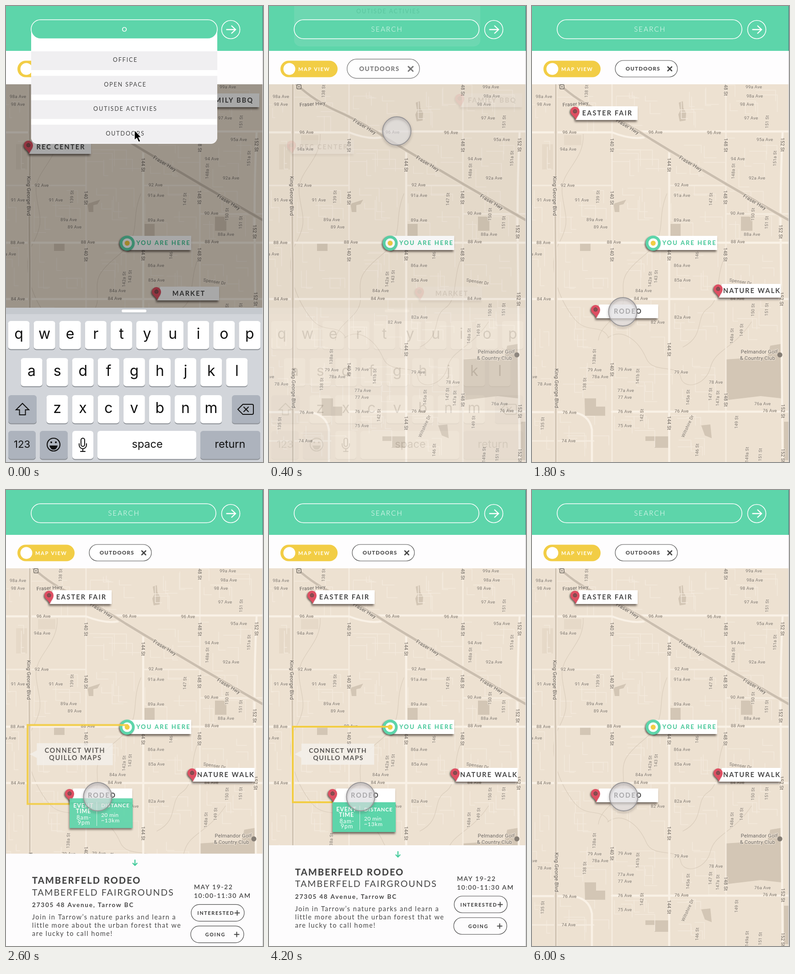
Recreate the animation shown at these times as an HTML page with a canvas. Size 562 by 996 pixels, loop 6100 ms.

```html
<!DOCTYPE html>
<html lang="en">
<head>
<meta charset="utf-8">
<title>Event map search</title>
<style>
  html, body { margin: 0; width: 100%; height: 100%; overflow: hidden; background: #ede1d1; }
  canvas { display: block; }
</style>
</head>
<body>
<canvas id="stage" width="562" height="996"></canvas>
<script>
const W = 562, H = 996, LOOP = 6100;
const TEAL = '#5dd5aa', YELLOW = '#f2cd45', INK = '#454545';

function surface(canvas) {
  canvas.width = W;
  canvas.height = H;
  const context = canvas.getContext('2d');
  context.lineCap = 'round';
  return context;
}
const stage = surface(document.getElementById('stage'));
const map = surface(document.createElement('canvas'));
const layer = surface(document.createElement('canvas'));
let g = map;

function text(str, x, y, size, { weight = 400, gap = 0, color = INK, align = 'center', font = 'Lato' } = {}) {
  g.font = `${weight} ${size}px ${font}, sans-serif`;
  g.letterSpacing = gap + 'px';
  g.textAlign = align;
  g.textBaseline = 'middle';
  g.fillStyle = color;
  g.fillText(str, x + (align === 'center' ? gap / 2 : 0), y + 0.5);
}
function rect(x, y, w, h, fill) {
  g.fillStyle = fill;
  g.fillRect(x, y, w, h);
}
function round(x, y, w, h, r, fill, stroke, width = 1.5) {
  g.beginPath();
  g.roundRect(x, y, w, h, r);
  if (fill) { g.fillStyle = fill; g.fill(); }
  if (stroke) { g.strokeStyle = stroke; g.lineWidth = width; g.stroke(); }
}
function disc(x, y, r, fill, stroke, width) {
  round(x - r, y - r, 2 * r, 2 * r, r, fill, stroke, width);
}
function line(d, color, width) {
  g.strokeStyle = color;
  g.lineWidth = width;
  g.stroke(new Path2D(d));
}
function shape(d, fill) {
  g.fillStyle = fill;
  g.fill(new Path2D(d));
}
function shadow(x, y, blur, color = 'rgba(40,30,25,.6)') {
  g.shadowOffsetX = x;
  g.shadowOffsetY = y;
  g.shadowBlur = blur;
  g.shadowColor = color;
}
// Draws on a separate layer, so that overlapping parts fade as one.
function group(alpha, draw) {
  if (alpha <= 0) return;
  const below = g;
  g = layer;
  g.clearRect(0, 0, W, H);
  g.save();
  draw();
  g.restore();
  g = below;
  g.globalAlpha = alpha;
  g.drawImage(layer.canvas, 0, 0);
  g.globalAlpha = 1;
}
function zoom(cx, cy, scale) {
  g.translate(cx, cy);
  g.scale(scale, scale);
  g.translate(-cx, -cy);
}

// ---- Map ----
const AVENUES = {
  '99a': [485, 177], '98a': [26, 198, 487, 197], '98': [26, 215, 470, 215], '97': [479, 245],
  '96': [82, 276, 270, 276, 398, 277], '95a': [509, 292], '94a': [79, 313], '94': [450, 334],
  '92a': [492, 376], '92': [78, 392, 327, 391], '91a': [328, 414], '91': [26, 424, 109, 424],
  '90': [449, 453], '89a': [137, 467, 328, 468], '89': [150, 483], '88a': [481, 499],
  '88': [25, 517, 179, 516, 450, 515], '87a': [4, 542], '86a': [328, 567], '85a': [329, 599],
  '84a': [244, 622], '84': [26, 640, 238, 639, 449, 639], '82a': [329, 680], '82': [275, 691],
  '79': [137, 795, 203, 794, 326, 800, -4, 810], '78a': [149, 810], '78': [27, 826, 402, 822],
  '77a': [205, 840], '77': [203, 855], '76a': [504, 869],
  '76': [82, 888, 203, 886, 327, 885, 520, 884], '75': [203, 917], '74': [80, 950]
};
const MAIN_STREETS = {
  140: [175, 304, 175, 419, 175, 543, 175, 794], 144: [300, 347, 300, 541, 300, 750, 300, 911],
  148: [424, 181, 424, 304, 423, 418, 423, 543, 424, 860],
  152: [548, 303, 544, 493, 546, 640, 549, 885, 549, 982]
};
const SIDE_STREETS = {
  '135': [23, 912], '138': [119, 186, 115, 826], '138a': [136, 766], '139': [144, 417],
  '141b': [231, 809], '142': [240, 894], '142a': [258, 597], '143': [271, 591],
  '145a': [341, 855], '146': [361, 539, 361, 970], '147': [391, 422, 390, 848], '147a': [406, 857],
  '148a': [440, 361, 437, 721], '149': [458, 708, 447, 909], '149a': [470, 980],
  '150': [483, 455, 483, 664], '151': [514, 253, 513, 473, 513, 663, 499, 980], '151a': [531, 333]
};

function mapText(str, x, y, degrees = 0, size = 9.8, color = '#7f776d') {
  g.save();
  g.translate(x, y);
  g.rotate(degrees * Math.PI / 180);
  g.font = `${size}px Roboto, sans-serif`;
  g.textAlign = 'center';
  g.textBaseline = 'middle';
  g.letterSpacing = '0.2px';
  g.strokeStyle = '#efe4d6';
  g.lineWidth = 2.5;
  g.strokeText(str, 0.1, 0.5);
  text(str, 0, 0, size, { font: 'Roboto', color, gap: 0.2 });
  g.restore();
}
function labels(table, suffix, degrees, size, color) {
  for (const [name, at] of Object.entries(table))
    for (let i = 0; i < at.length; i += 2) mapText(name + suffix, at[i], at[i + 1], degrees, size, color);
}
function drawMap() {
  let seed = 11;
  const random = () => (seed = seed * 16807 % 2147483647) / 2147483647;
  const columns = [0, 52, 175, 300, 424, 548], rows = [171, 276, 392, 517, 640, 764, 887, 996];
  rect(0, 0, W, H, '#ede1d1');
  g.lineJoin = 'round';

  shape('M424 772L515 766 521 742 545 738V857L500 852 424 861Z M115 857h25v18h20v20h-44z M248 940h50v25h-30v-15h-20z'
    + 'M457 460h25v31h-25z M303 476h22v26h-22z M105 518h23v17h-23z M178 432l28-9-6 10-9 2v15h-10z'
    + 'M370 916l20-2 3 30-15-6z M551 908h11v84h-11z M321 211l9-3 1 15 6 10-1 17-13 2-3-15 4-8z', '#d3c6b5');
  shape('M22 302h24v55h-24z M70 282h38v22h-38z', '#e6d9c8');

  for (let r = 0; r < 7; r++) for (let c = 0; c < 5; c++) {
    if (r > 4 && c === 4 || c === 1 && r === 1) continue;
    const x = columns[c], y = rows[r], w = columns[c + 1] - x, h = rows[r + 1] - y;
    for (let n = 0; n < (c ? 7 : 3); n++) {
      const px = x + random() * w * 0.7, py = y + random() * h * 0.7;
      const dx = w * (0.15 + random() * 0.3), dy = h * (0.1 + random() * 0.25);
      line(random() < 0.5 ? `M${px} ${py}h${dx}v${dy}` : `M${px} ${py}v${dy}h${dx * 0.5}`, '#f3e9dc', 1.5);
    }
  }
  line('M112 280C115 340 60 360 66 410S85 470 58 520 60 640 90 680 150 690 168 725'
    + 'M295 410C270 470 300 500 245 545S200 600 200 640 150 690 145 730M165 725C200 700 235 735 250 770S320 780 325 810 380 830 390 790 440 750 480 690'
    + 'M423 545C400 590 415 640 385 660S380 720 330 745', '#dacdbc', 1.2);
  line('M0 392H175M300 392H424M424 454H562M175 171V996M424 171V996M0 950H135M175 764V996', '#f5ecdf', 3);
  line('M0 276H175Q215 292 245 287M225 274H562M0 517H562M0 640H562M300 315V996M548 276Q542 400 544 520T548 996'
    + 'M0 887H85Q125 890 131 925V996M175 886H562', '#f9f1e6', 4.5);
  line('M52 171V360Q50 460 52 560V996', '#f2e7d9', 8);
  line('M52 171V360Q50 460 52 560V996', '#d2c5b4', 3.5);
  const highway = 'M60 171Q100 208 150 230T262 292L300 315 425 389 562 468';
  line(highway, '#eee2d3', 9);
  line(highway, '#cabeaf', 5);

  labels(AVENUES, ' Ave', 0);
  labels(MAIN_STREETS, ' St', 90, 10.3, '#6e675f');
  labels(SIDE_STREETS, ' St', -88, 9.6);
  const road = '#5f5952';
  mapText('Fraser Hwy', 95, 214, -4, 11, road);
  mapText('Fraser Hwy', 209, 263, 31, 11, road);
  mapText('Fraser Hwy', 347, 344, 31, 11, road);
  mapText('Fraser Hwy', 487, 428, 31, 11, road);
  mapText('King George Blvd', 50, 415, 90, 11, road);
  mapText('King George Blvd', 54, 835, 90, 11, road);
  mapText('Spenser Dr', 456, 602, 9);
  mapText('Wiltshire Dr', 340, 918, -66);
  mapText('Pelmandor Golf', 497, 755, 0, 11.3, '#6b655e');
  mapText('& Country Club', 493, 769, 0, 11.3, '#6b655e');
  disc(542, 762, 5.5, '#857d74');
  round(61, 172, 9, 9, 1, '#efe4d6', '#6b655e', 1.5);
  disc(65.5, 176.5, 1.5, '#6b655e');
}

// ---- Markers and event details ----
function tag(name, x, y, textX = x + 70) {
  g.save();
  shadow(-2, 4, 4);
  shape(`M${x + 8} ${y}H${x + 137}V${y + 30}H${x + 1}Z`, '#fff');
  shadow(-2, 2, 3);
  shape(`M${x + 2} ${y + 30}C${x} ${y + 22} ${x - 10} ${y + 19} ${x - 10} ${y + 11}a10 10 0 0 1 20 0C${x + 10} ${y + 19} ${x + 4} ${y + 22} ${x + 2} ${y + 30}Z`, '#de4f62');
  g.restore();
  disc(x, y + 11, 4, '#8d4c50', '#5e4a4b', 1);
  text(name, textX, y + 15, 14.5, { weight: 700, gap: 2.1 });
}
function youAreHere() {
  g.save();
  shadow(-2, 4, 4);
  rect(266, 502, 139, 31, '#fff');
  shadow(-2, 2, 3);
  disc(265, 518, 16.5, TEAL);
  g.restore();
  disc(265, 518, 10.5, '#fff');
  disc(265, 518, 5.5, YELLOW);
  text('YOU ARE HERE', 285, 518, 13, { weight: 700, gap: 2.2, color: '#42c697', align: 'left' });
}
function route(rest) {
  zoom(158, 599, 1 + 0.55 * rest);
  line('M261 517H52V682H141', YELLOW, 4);
}
function callout(rest) {
  zoom(151, 577, 1 + 0.55 * rest);
  shape('M71 554H230V600H71V585L56 577 71 569Z', 'rgba(244,240,236,.85)');
  const style = { weight: 700, gap: 1.5, color: '#55524f' };
  text('CONNECT WITH', 150, 569, 14, style);
  text('QUILLO MAPS', 151, 585, 14, style);
}
function timeCard(rest) {
  g.translate(0, -105 * rest);
  g.save();
  shadow(-1, 4, 4);
  rect(139, 682, 138, 65, TEAL);
  g.restore();
  const head = { weight: 700, gap: 0.8, color: '#fff' }, body = { gap: 1, color: '#fff' };
  text('EVENT', 169, 698, 12.5, head);
  text('TIME', 169, 710, 12.5, head);
  text('8am-', 170, 724, 12.5, body);
  text('9pm', 170, 735, 12.5, body);
  line('M198.5 690V742', '#d5f3e7', 1);
  text('DISTANCE', 208, 698, 11.6, { ...head, align: 'left' });
  text('20 min', 208, 718, 12, { color: '#fff', gap: 0.3, align: 'left' });
  text('~13km', 208, 730, 12, { color: '#fff', gap: 0.8, align: 'left' });
}
function infoPanel(rest) {
  g.translate(0, 225 * rest);
  rect(0, 776, W, 225, '#fdfcfd');
  line('M282 790V801M277.5 797L282 801.5 286.5 797', '#45cb9c', 2.4);
  const left = { align: 'left' };
  text('TAMBERFELD RODEO', 57, 835, 20, { ...left, weight: 800, gap: 2 });
  text('TAMBERFELD FAIRGROUNDS', 57, 861, 19.5, { ...left, gap: 2 });
  text('27305 48 Avenue, Tarrow BC', 57, 888, 13.5, { ...left, weight: 700, gap: 1.8 });
  ['Join in Tarrow’s nature parks and learn a', 'little more about the urban forest that we', 'are lucky to call home!']
    .forEach((row, i) => text(row, 57, 915 + 18 * i, 14.5, { ...left, gap: 1.5 }));
  text('MAY 19-22', 411, 849, 14, { ...left, weight: 600, gap: 1.5 });
  text('10:00-11:30 AM', 411, 868, 14, { ...left, weight: 600, gap: 1.5 });
  [['INTERESTED', 405, 887], ['GOING', 404, 934]].forEach(([name, x, y]) => {
    round(x, y, 116, 36.5, 18, null, '#4c4c4c', 1.2);
    text(name, x + 53, y + 19, 10.7, { weight: 800, gap: 1.7 });
    line(`M${x + 95.5} ${y + 18.5}h10m-5-5v10`, INK, 2);
  });
}

// ---- Interface ----
function keyboard() {
  rect(0, 659, W, H - 659, '#d2d5da');
  rect(0, 659, W, 14, '#c5c9ce');
  round(253, 663, 54, 6, 3, '#fff');
  const key = (x, y, w, fill = '#fff') => {
    round(x, y + 1.5, w, 62, 6, '#8c9096');
    round(x, y, w, 61.5, 6, fill);
  };
  const gray = '#adb3bd', font = { font: 'Inter', color: '#111' };
  [['qwertyuiop', 28, 688], ['asdfghjkl', 56, 769], ['zxcvbnm', 112, 850]].forEach(([letters, x, y]) =>
    [...letters].forEach((letter, i) => {
      const cx = x + i * 56.1;
      key(cx - 23.5, y, 47);
      text(letter, cx, y + 29, 32, font);
    }));
  key(5, 850, 62, gray);
  key(494, 850, 62, gray);
  key(5, 928, 60, gray);
  key(74, 928, 61, gray);
  key(145, 928, 46);
  key(200, 928, 216);
  key(425, 928, 131, gray);
  text('123', 35, 958, 22, font);
  text('space', 309, 957, 23.5, font);
  text('return', 490, 957, 23.5, font);
  line('M36 868L22 882H29.5V893H42.5V882H50Z', '#111', 2);
  line('M518 870H538Q541 870 541 873V889Q541 892 538 892H518L507 881ZM520 876l10 10m0-10l-10 10', '#111', 2);
  disc(104, 958, 14, null, '#111', 2.2);
  disc(99, 953, 2, '#111');
  disc(109, 953, 2, '#111');
  shape('M95 960H113Q111 969 104 969T95 960Z', '#111');
  round(164, 944, 8, 18, 4, null, '#111', 2);
  line('M160 956v3a8 8 0 0 0 16 0v-3M168 967v6M163 973h10', '#111', 2);
}
function dropdown(rest) {
  g.translate(0, -238 * (1 - rest));
  round(55, 51, 407, 250, [0, 0, 14, 14], '#fff');
  ['OFFICE', 'OPEN SPACE', 'OUTISDE ACTIVIES', 'OUTDOORS'].forEach((name, i) => {
    round(55, 99 + 53.4 * i, 407, 41, i === 3 ? [0, 0, 14, 14] : 0, '#f0eff1');
    text(name, 260, 118 + 53.5 * i, 12.5, { gap: 1.85 });
  });
}
function chip(rest) {
  zoom(250, 137, 1 + 1.57 * rest);
  round(182, 119, 136, 36, 18, '#fff', '#555', 1.2);
  text('OUTDOORS', 242, 137, 11.5, { weight: 800, gap: 1.2 });
  line('M297 133L305.5 141.5M305.5 133L297 141.5', INK, 2.6);
}
function header(opening, rest) {
  rect(0, 0, W, 98, TEAL);
  rect(0, 98, W, 73, '#fefdfe');
  round(25, 119.5, 125, 36, 18, YELLOW);
  disc(44.5, 137.5, 13, '#fff');
  text('MAP VIEW', 98, 138, 11, { weight: 800, gap: 1.6, color: '#fffbe8' });
  group(opening ** 3, () => chip(rest));
  group(rest, () => dropdown(rest));
  round(55, 30, 404 + 3 * rest, 41.5, 20.5, TEAL, '#fff', 1.6);
  group(opening, () => text('SEARCH', 257, 51, 15, { weight: 300, gap: 2.1, color: '#fff' }));
  group(rest, () => text('O', 259, 51, 14, { weight: 600, color: '#fff' }));
  disc(491.5, 51.5, 20, null, '#fff', 1.6);
  line('M482.5 51.5H502M493.5 43.5L502 51.5 493.5 59.5', '#fff', 2.4);
}
function touch(x, y) {
  disc(x, y, 31, 'rgba(222,221,223,.66)');
  g.save();
  shadow(0, 3, 5, 'rgba(60,50,50,.5)');
  disc(x, y, 31, null, '#969496', 1.8);
  g.restore();
}
function arrowCursor() {
  const d = 'M281 271V293L286 288.5 290 297 294 295.5 290 287H296Z';
  shape(d, '#000');
  line(d, '#fff', 1.2);
}

// ---- Timeline ----
const progress = (t, start, length) => Math.min(1, Math.max(0, (t - start) / length));
const easeOut = p => 1 - (1 - p) ** 2.2;
const easeInOut = p => p * p * (3 - 2 * p);

function draw(t) {
  const opening = easeOut(progress(t, 80, 500)), rest = 1 - opening;
  const found = easeOut(progress(t, 420, 350));
  const detail = easeOut(progress(t, 2260, 500)) * (1 - easeOut(progress(t, 4250, 500)));
  const away = 1 - detail;

  g.drawImage(map.canvas, 0, 0);
  group(rest, () => {
    tag('REC CENTER', 49, 293);
    tag('MARKET', 329, 613);
    tag('FAMILY BBQ', 417, 191);
  });
  youAreHere();
  group(detail, () => route(away));
  group(found, () => {
    tag('EASTER FAIR', 94, 219);
    tag('NATURE WALK', 407, 607, 480);
    tag('RODEO', 139, 652);
  });
  group(detail, () => timeCard(away));
  group(detail, () => callout(away));
  group(rest, () => {
    rect(0, 171, W, 488, 'rgba(0,0,0,.34)');
    keyboard();
  });
  if (detail > 0) group(1, () => infoPanel(away));
  header(opening, rest);
  rect(560.7, 0, 1.3, 98, '#4e8a86');
  rect(560.7, 98, 1.3, H - 98, '#d5d3d5');

  if (t < 100) arrowCursor();
  else {
    const move = easeInOut(progress(t, 1100, 600)), drift = 2 * progress(t, 1800, 400);
    touch(279.5 - 81 * move + drift, 273 + 395 * move + drift);
  }
}

drawMap();
g = stage;
const begin = performance.now();
function tick() {
  const t = (performance.now() - begin) % LOOP;
  draw(Math.floor(t / 100) * 100);
  requestAnimationFrame(tick);
}
tick();
</script>
</body>
</html>
```
